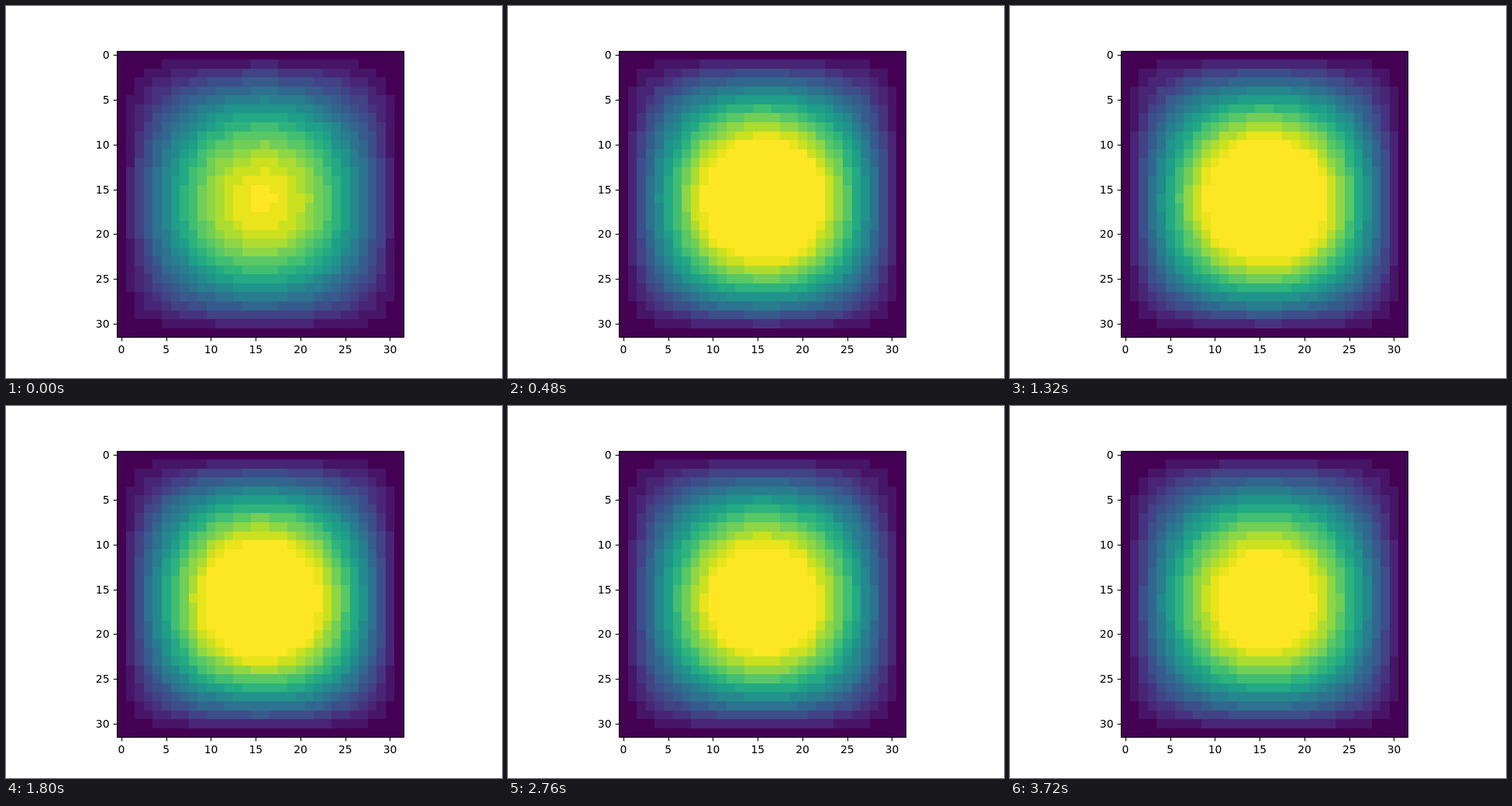
An HTML page with a canvas that plays this animation: 640x480 px, repeating every 3.84 s.

```html
<!DOCTYPE html>
<html lang="en">
<head>
<meta charset="utf-8">
<title>Diffusing field</title>
<style>
  html, body { margin: 0; width: 100%; height: 100%; overflow: hidden; background: #fff; }
  canvas { display: block; }
</style>
</head>
<body>
<canvas id="plot" width="640" height="480"></canvas>
<script>
const ctx = document.getElementById('plot').getContext('2d');
const SIZE = 32, CELL = 11.55, LEFT = 143.2, TOP = 57.6;
const STEP = 120, STEPS = 32, LEVELS = 22;

// Viridis colour map in steps of 5 %
const stops = ('440154 471365 482475 463480 414487 3b528b 355f8d 2f6c8e 2a788e 25848e 21918c ' +
  '1e9c89 22a884 2fb47c 44bf70 5ec962 7ad151 9bd93c bddf26 dfe318 fde725')
  .split(' ').map(hex => [0, 2, 4].map(i => parseInt(hex.slice(i, i + 2), 16)));

function viridis(v) {
  const p = v * 20, i = Math.min(19, Math.floor(p));
  return `rgb(${stops[i].map((c, j) => Math.round(c + (stops[i + 1][j] - c) * (p - i)))})`;
}

const colors = Array.from({ length: LEVELS + 1 }, (_, k) =>
  viridis(k % LEVELS ? (k + 0.25) / LEVELS : k / LEVELS));

// Lower bound of each colour level above the darkest
const cuts = Array.from({ length: LEVELS }, (_, i) => 0.0451 * (i + 1));
[cuts[0], cuts[1], cuts[2]] = [0.043, 0.092, 0.138];

// Half a sine wave, its peak pushed slightly past the middle
const wave = skew => Array.from({ length: SIZE }, (_, i) => {
  const a = Math.PI * i / (SIZE - 1);
  return Math.sin(a) - skew * Math.sin(2 * a);
});
const across = wave(0.008), down = wave(0.04);

// Quick rise followed by slow decay
const strength = n => 1.348 * Math.exp(-0.0047 * n) - 0.348 * Math.exp(-0.5 * n);

const edge = (start, i) => Math.round(start + CELL * i);

function drawField(n) {
  const amp = strength(n);
  for (let r = 0; r < SIZE; r++) {
    for (let c = 0; c < SIZE; c++) {
      const v = amp * across[c] * down[r];
      const x = edge(LEFT, c), y = edge(TOP, r);
      ctx.fillStyle = colors[cuts.filter(cut => v >= cut).length];
      ctx.fillRect(x, y, edge(LEFT, c + 1) - x, edge(TOP, r + 1) - y);
    }
  }
}

function line(x1, y1, x2, y2) {
  ctx.beginPath();
  ctx.moveTo(x1, y1);
  ctx.lineTo(x2, y2);
  ctx.stroke();
}

function drawAxes() {
  ctx.strokeStyle = ctx.fillStyle = '#000';
  ctx.lineWidth = 1.11;
  ctx.strokeRect(143.5, 58.5, 370, 369);
  ctx.font = '13.89px "DejaVu Sans", sans-serif';
  for (let v = 0; v <= 30; v += 5) {
    const x = LEFT + CELL * (v + 0.5), y = TOP + CELL * (v + 0.5);
    const sx = Math.round(x) + 0.5, sy = Math.round(y) + 0.5;
    line(sx, 427.5, sx, 432.4);
    line(143.5, sy, 138.6, sy);
    ctx.textAlign = 'center';
    ctx.fillText(v, x, 448);
    ctx.textAlign = 'right';
    ctx.fillText(v, 133.5, Math.round(y + 5));
  }
}

function draw(now) {
  ctx.fillStyle = '#fff';
  ctx.fillRect(0, 0, 640, 480);
  drawField(Math.floor(now / STEP) % STEPS);
  drawAxes();
}

const start = performance.now();
function tick() {
  draw(performance.now() - start);
  requestAnimationFrame(tick);
}
tick();
</script>
</body>
</html>
```
